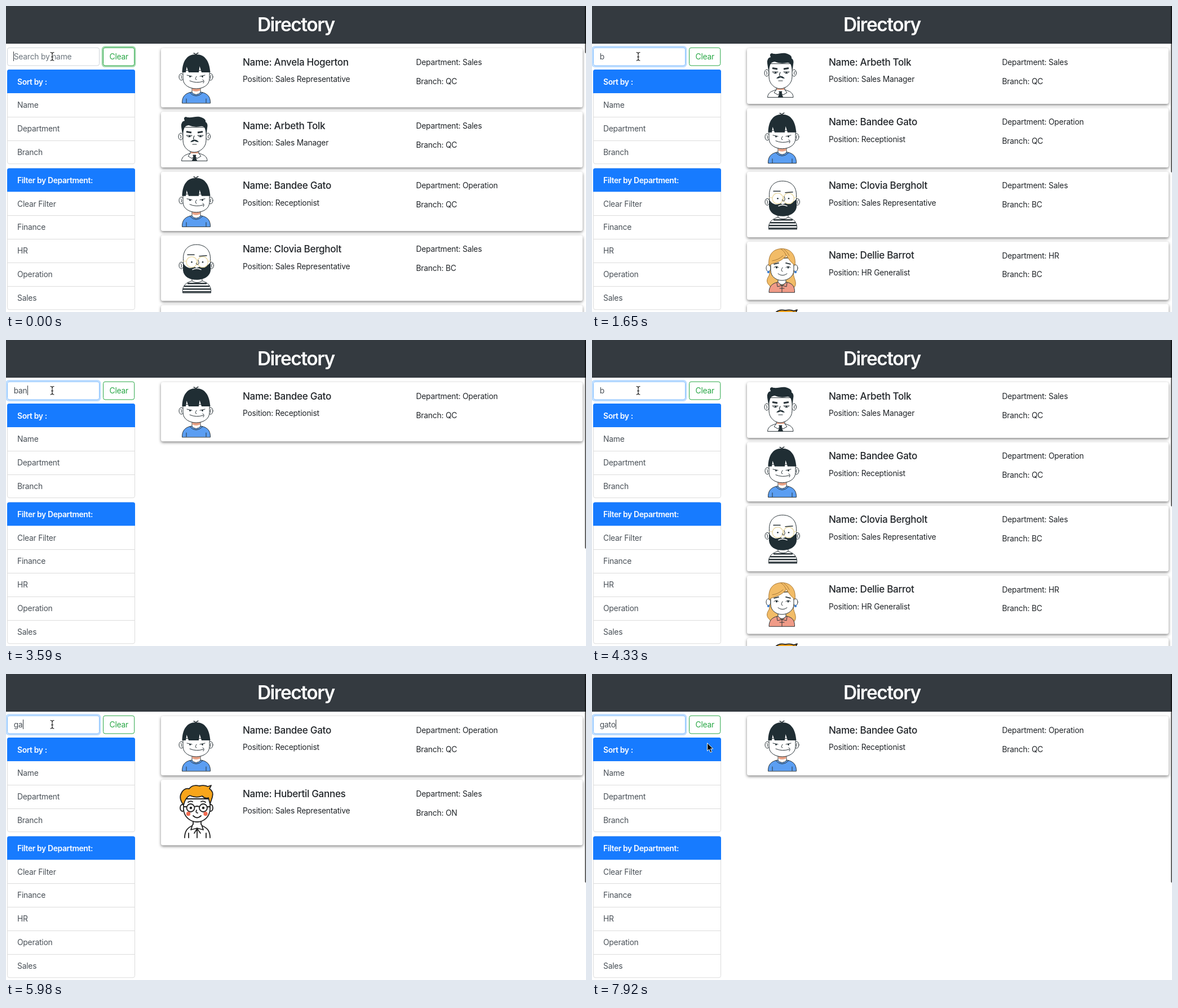
Recreate the animation shown at these times as an HTML page. Size 1029 by 544 pixels, loop 8000 ms.

```html
<!DOCTYPE html>
<html lang="en">
<head>
<meta charset="utf-8">
<title>Directory</title>
<style>
html, body { margin: 0; width: 100%; height: 100%; overflow: hidden; background: #fff; }
svg { display: block; width: 1029px; height: 544px; }
text { font: 400 13.8px Inter, Roboto, sans-serif; letter-spacing: -.2px; font-optical-sizing: none; fill: #212529; white-space: pre; }
.title { font-size: 33.5px; font-weight: 600; letter-spacing: -1.5px; fill: #fff; text-anchor: middle; }
.name { font-size: 17.1px; font-weight: 500; letter-spacing: -.33px; }
.item { fill: #495057; }
.head { fill: #fff; font-weight: 600; letter-spacing: -.33px; }
.card { fill: #fff; filter: drop-shadow(0 2.2px 2.6px rgba(0,0,0,.5)); }
.art { stroke: #2a3439; stroke-width: 1; stroke-linecap: round; stroke-linejoin: round; fill: none; }
.bold { stroke: #222; stroke-width: 1.8; }
.w { fill: #fff; }
.d { fill: #202e34; }
.n { stroke: none; }
.blond { fill: #f2bc67; stroke: #a87836; }
</style>
</head>
<body>
<svg viewBox="0 0 1029 544" xmlns="http://www.w3.org/2000/svg">
  <defs>
    <g id="kid" class="art">
      <path class="w" d="M330 69V80Q337 87 345 80V69Z"/>
      <path class="n" fill="#e9a184" d="M330.500 71H344.500V75Q337 79 330.500 75Z"/>
      <path fill="#5b9ef2" d="M312.500 97.500C312 85 319 80 329 78Q337 87 346 78C356 80 363 85 362.500 97.500Z"/>
      <path d="M326 79Q337 91 349 79M320 90V97M355 90V97"/>
      <ellipse class="w" cx="311" cy="51" rx="4" ry="6"/>
      <ellipse class="w" cx="363" cy="51" rx="4" ry="6"/>
      <path d="M310 48Q313 50 311 54M364 48Q361 50 363 54"/>
      <path class="w" d="M314 40V54C314 66 326 72 337.500 72S361 66 361 54V40Z"/>
      <path class="d n" d="M312.500 43C313 24 320 11 337 11S361 24 362.500 43H347L343.500 32 342 43H324L320.500 33 319 43Z"/>
      <path stroke-width="1.500" d="M336 12Q336 9 333 9M337 12Q338 9 341 8.500"/>
      <path d="M321 48L330 50M344 50L353 48M338 50Q334 56 338 56M326 58Q337 63 350 59M349 56Q353 58 350 62"/>
      <circle class="d n" cx="326.500" cy="50.500" r="1.400"/>
      <circle class="d n" cx="348.500" cy="50.500" r="1.400"/>
    </g>

    <g id="man" class="art">
      <path class="w" d="M327 64V76L334 80 342 76V64Z"/>
      <path class="n" fill="#e9a184" d="M328 70H341V74Q334 77 328 74Z"/>
      <path class="w" d="M311.500 87C312 79 319 76 327 74L334 79 342 74C350 76 357 79 357 87Z"/>
      <path class="w" d="M327 74L323 79 330 83 334 78 339 83 346 79 342 74"/>
      <path class="d" d="M332 77H337L336 80 338.500 87H330.500L333 80Z"/>
      <ellipse class="w" cx="310" cy="44" rx="4" ry="6"/>
      <ellipse class="w" cx="358.500" cy="44" rx="4" ry="6"/>
      <path d="M309 41Q312 44 310 47M360 41Q357 44 359 47"/>
      <path class="w" d="M314 28V51C314 64 325 72 334 72S355 64 355 51V28Z"/>
      <path class="d n" d="M313 40L311 27Q310 17 317 16Q314 10 319 9C329 13 338 5 349 11Q355 14 354 18Q359 21 357 29L355.500 40 353 30Q351 25 345 26Q333 28 324 24Q317 25 316 30Z"/>
      <path stroke-width="3" stroke-linecap="butt" d="M320 35.500L329 37M340 37L349 35.500"/>
      <path stroke-width="1.200" d="M320 42H330M340 42H350M334 43Q331 49 334 49M331 58H338"/>
      <path d="M321 43Q325 47 329 43M341 43Q345 47 349 43"/>
      <circle class="d n" cx="325.500" cy="43.500" r="1.500"/>
      <circle class="d n" cx="345" cy="43.500" r="1.500"/>
      <path class="d n" d="M327 54Q331 49 334.500 50Q338 49 342 54Q338 54 334.500 52Q331 54 327 54Z"/>
    </g>

    <g id="beard" class="art">
      <path class="w" d="M313.500 102C312 90 319 84 330 81H348C358 84 365 90 363.500 102Z"/>
      <path stroke-width="2.500" stroke-linecap="butt" d="M322 85.500H356M316 90.500H361M314 95.500H363M314 100.500H363"/>
      <path class="w" d="M330 75V81Q339 87 348 81V75Z"/>
      <ellipse class="w" cx="311" cy="53.500" rx="4" ry="6"/>
      <ellipse class="w" cx="364.500" cy="53.500" rx="4" ry="6"/>
      <path d="M310 50Q313 53 311 57M366 50Q363 53 365 57"/>
      <path class="w" d="M314.500 62V41C314.500 25 324 16.500 338 16.500S362.500 25 362.500 41V62Z"/>
      <path class="d n" d="M314 48Q317 56 325 58Q331 58 334 56L338 58 343 56Q355 58 363 48V62C362 73 351 79 338 79S315 73 314 62Z"/>
      <path stroke="#fff" stroke-width="1.500" d="M331 61Q338 57 346 61"/>
      <g fill="#fff" stroke="#ead9a2" stroke-width="1.300">
        <circle cx="329.500" cy="47.500" r="9.500"/><circle cx="349" cy="47.500" r="9.500"/>
      </g>
      <path stroke="#ead9a2" d="M314 46H320M358 46H363"/>
      <path stroke-width="1.500" d="M322 34.500H334M343 37L356 36"/>
      <path d="M341 44Q344 51 340 52Q336 52 338 49"/>
      <circle class="d n" cx="329.500" cy="47.500" r="1.300"/>
      <circle class="d n" cx="349" cy="47.500" r="1.300"/>
    </g>

    <g id="girl" class="art">
      <path class="blond" d="M317 31C309 44 320 54 312 64Q308 72 315 78Q318 86 330 83H347Q359 86 361 77C363 67 353 60 360 50L357 27Z"/>
      <path class="w" d="M330 64V73Q337 80 344 73V64Z"/>
      <path fill="#f09b87" d="M314 90C314 79 320 74 330 72L337 79 345 72C355 74 360 79 359.500 90Z"/>
      <path d="M328 73L329 80 337 78 345 80 346 73M337 79V90M333 83H341"/>
      <ellipse class="w" cx="313" cy="47" rx="4" ry="6"/>
      <ellipse class="w" cx="361" cy="47" rx="4" ry="6"/>
      <path class="w" d="M317 31V51C317 62 327 69 337 69S358 62 358 51V29Z"/>
      <path class="blond" d="M314 43C312 24 320 13 337 12.500C355 13 362 26 360 42Q351 36 345 24C337 35 326 37 318 40Z"/>
      <path class="blond" style="fill:none" d="M344 24Q342 17 335 13M350 25Q347 18 341 14M339 25Q330 33 320 34"/>
      <path stroke-width="1.800" d="M323 40L331 38M344 38L352 40"/>
      <path d="M323 46Q327 42 331 46M344 46Q348 42 352 46M338 46Q334 52 338 53M330 57Q338 63 346 57"/>
      <circle class="d n" cx="327.500" cy="46" r="1.600"/>
      <circle class="d n" cx="348" cy="46" r="1.600"/>
      <circle class="n" fill="#3f80d2" cx="313" cy="54" r="2.200"/>
      <circle class="n" fill="#3f80d2" cx="361" cy="54" r="2.200"/>
    </g>

    <g id="red" class="art bold">
      <path class="w" d="M317 103C317 91 322 85 332 81V72H346V81C357 85 362 91 362 103"/>
      <path class="w" d="M331 80L328 89 339 86 350 89 347 80M339 86V103M339 87L334 95M339 87L345 95M324 95V103M355 95V103"/>
      <ellipse class="w" cx="313" cy="50" rx="4" ry="6"/>
      <ellipse class="w" cx="363" cy="50" rx="4" ry="6"/>
      <path class="w" d="M315 34V53C316 66 327 75 339 75S361 66 362 53V34Z"/>
      <path fill="#f8a51b" d="M315 45Q306 33 311 24Q316 14 325 16Q331 8 343 11Q352 9 358 12L364 10 361 16Q369 21 366 31L362 43 359 32Q353 34 348 29Q337 33 326 28Q318 32 315 45Z"/>
      <circle class="w" cx="327.500" cy="50" r="7"/>
      <circle class="w" cx="350" cy="50" r="7"/>
      <path d="M335 48Q339 46 343 48M316 48H320M357 48H362M338 54Q336 59 340 59M332 64Q339 71 346 64M323 40Q327 37 331 39M346 39Q350 37 354 40"/>
      <circle class="n" fill="#222" cx="328" cy="50" r="2.300"/>
      <circle class="n" fill="#222" cx="350" cy="50" r="2.300"/>
      <circle class="n" fill="#f26b50" cx="323.500" cy="60.500" r="3.700"/>
      <circle class="n" fill="#f26b50" cx="354" cy="60.500" r="3.700"/>
    </g>

    <path id="bar" d="M79 82.500Q82 82.500 82 85V94.500Q82 97 79 97M85 82.500Q82 82.500 82 85M85 97Q82 97 82 94.500M80.500 90.500H83.500"/>
  </defs>

  <rect width="1029" height="544" fill="#fff"/>
  <g id="cards"></g>
  <rect width="1029" height="67" fill="#343a40"/>
  <text class="title" x="514.300" y="45">Directory</text>
  <rect id="thumb" x="1027" y="-4" width="4" rx="2" fill="#000" fill-opacity=".6"/>

  <rect id="inputRing" x=".6" y="72.400" width="166.300" height="35.300" rx="4.500" fill="none" stroke="#007bff" stroke-opacity=".26" stroke-width="2.700"/>
  <rect id="input" x="2.500" y="74.200" width="163" height="31.800" rx="3.500" fill="#fff"/>
  <rect id="clearRing" x="171" y="72.700" width="58" height="34.800" rx="4.500" fill="none" stroke="#28a745" stroke-opacity=".43" stroke-width="2.700"/>
  <rect x="172.500" y="74.200" width="55.200" height="31.800" rx="3.500" fill="#fff" stroke="#28a745"/>
  <text x="183.500" y="95" style="fill:#28a745">Clear</text>
  <text id="query" x="13.700" y="95"></text>
  <rect id="caret" y="81" width="1" height="17" fill="#343a40"/>
  <g id="menus"></g>

  <g id="beam" fill="none" stroke-linecap="round">
    <use href="#bar" stroke="#fff" stroke-width="2.400"/>
    <use href="#bar" stroke="#111" stroke-width="1.100"/>
  </g>
  <path id="arrow" d="M0 0V14L3.300 11 5.600 16.700 8.200 15.600 5.900 10.200H10.300Z" fill="#000" stroke="#fff"/>
</svg>
<script>
const $ = id => document.getElementById(id);
const attr = (id, key, value) => $(id).setAttribute(key, value);
const show = (id, on) => attr(id, 'visibility', on ? 'visible' : 'hidden');
const text = (x, y, str, cls = '') => `<text x="${x}" y="${y}" class="${cls}">${str}</text>`;

const TOP = 75, GAP = 7.7, LOOP = 8000;
const heights = { kid: 105.3, man: 99, beard: 116.5, girl: 103.5, red: 116.5 };
const people = [
  ['Anvela Hogerton', 'Sales Representative', 'Sales', 'QC', 'kid'],
  ['Arbeth Tolk', 'Sales Manager', 'Sales', 'QC', 'man'],
  ['Bandee Gato', 'Receptionist', 'Operation', 'QC', 'kid'],
  ['Clovia Bergholt', 'Sales Representative', 'Sales', 'BC', 'beard'],
  ['Dellie Barrot', 'HR Generalist', 'HR', 'BC', 'girl'],
  ['Hubertil Gannes', 'Sales Representative', 'Sales', 'ON', 'red']
];

// time, typed text, caret on
const steps = [
  [0, '', 1], [600, '', 0], [1050, '', 1],
  [1200, 'b', 1], [1650, 'b', 0], [2250, 'ba', 1],
  [2700, 'ban', 1], [3150, 'ban', 0], [3590, 'ban', 1],
  [4190, 'ba', 0], [4330, 'b', 0],
  [4630, '', 1], [5080, '', 0], [5680, '', 1],
  [5830, 'g', 1], [5980, 'ga', 1], [6430, 'ga', 0],
  [6730, 'gat', 1], [6870, 'gato', 1], [7320, 'gato', 0], [7770, 'gato', 1]
];
const carets = { '': 13, b: 22, ba: 30, ban: 38, g: 22, ga: 30, gat: 34, gato: 42 };
const thumbs = { '': 84, b: 296, g: 250 };

function menu(y, title, items) {
  const step = 41.9, h = step * (items.length + 1);
  let out = `<rect x="2.500" y="${y + .5}" width="226" height="${h - .5}" rx="3.500" fill="#fff" stroke="#dcdcdc"/>
    <path d="M2 ${y + step}V${y + 3.5}q0-3.500 3.500-3.500H225.500q3.500 0 3.500 3.500V${y + step}Z" fill="#177bff"/>`;
  out += text(20, y + 27, title, 'head');
  items.forEach((item, i) => {
    const line = y + step * (i + 1);
    if (i) out += `<path d="M2.500 ${Math.round(line) + .5}H228.500" stroke="#dcdcdc"/>`;
    out += text(20, line + 26.2, item, 'item');
  });
  return out;
}

function card([name, role, dept, branch, face], y) {
  return `<g transform="translate(0 ${y.toFixed(1)})">
    <rect class="card" x="275" width="748" height="${heights[face]}" rx="3.500"/>
    <use href="#${face}"/>` +
    text(420, 30.5, 'Name: ' + name, 'name') +
    text(420, 60.2, 'Position: ' + role) +
    text(727.5, 29.7, 'Department: ' + dept) +
    text(727.5, 63.5, 'Branch: ' + branch) + '</g>';
}

function list(query) {
  let y = TOP, out = '';
  for (const p of people) {
    if (!p[0].toLowerCase().includes(query)) continue;
    out += card(p, y);
    y += heights[p[4]] + GAP;
  }
  return out;
}

let shown = null;
function draw(t) {
  const [, query, caretOn] = steps.filter(s => s[0] <= t).pop();
  if (query !== shown) {
    shown = query;
    $('cards').innerHTML = list(query);
    $('query').textContent = query || 'Search by name';
    $('query').style.fill = query ? '#495057' : '#6c757d';
    attr('thumb', 'height', (thumbs[query] || 371) + 4);
    attr('caret', 'x', carets[query]);
  }
  show('caret', caretOn);
  const focused = t >= 150;
  show('inputRing', focused);
  show('clearRing', !focused);
  attr('input', 'stroke', focused ? '#80bdff' : '#ced4da');
  const leaving = t >= 7770;
  show('beam', !leaving);
  show('arrow', leaving);
  attr('arrow', 'transform', t < 7920 ? 'translate(177.500 116.500)' : 'translate(204.500 122.800)');
}

$('menus').innerHTML =
  menu(113, 'Sort by :', ['Name', 'Department', 'Branch']) +
  menu(288.4, 'Filter by Department:', ['Clear Filter', 'Finance', 'HR', 'Operation', 'Sales']);

const start = performance.now();
function tick() {
  draw((performance.now() - start) % LOOP);
  requestAnimationFrame(tick);
}
tick();
</script>
</body>
</html>
```
